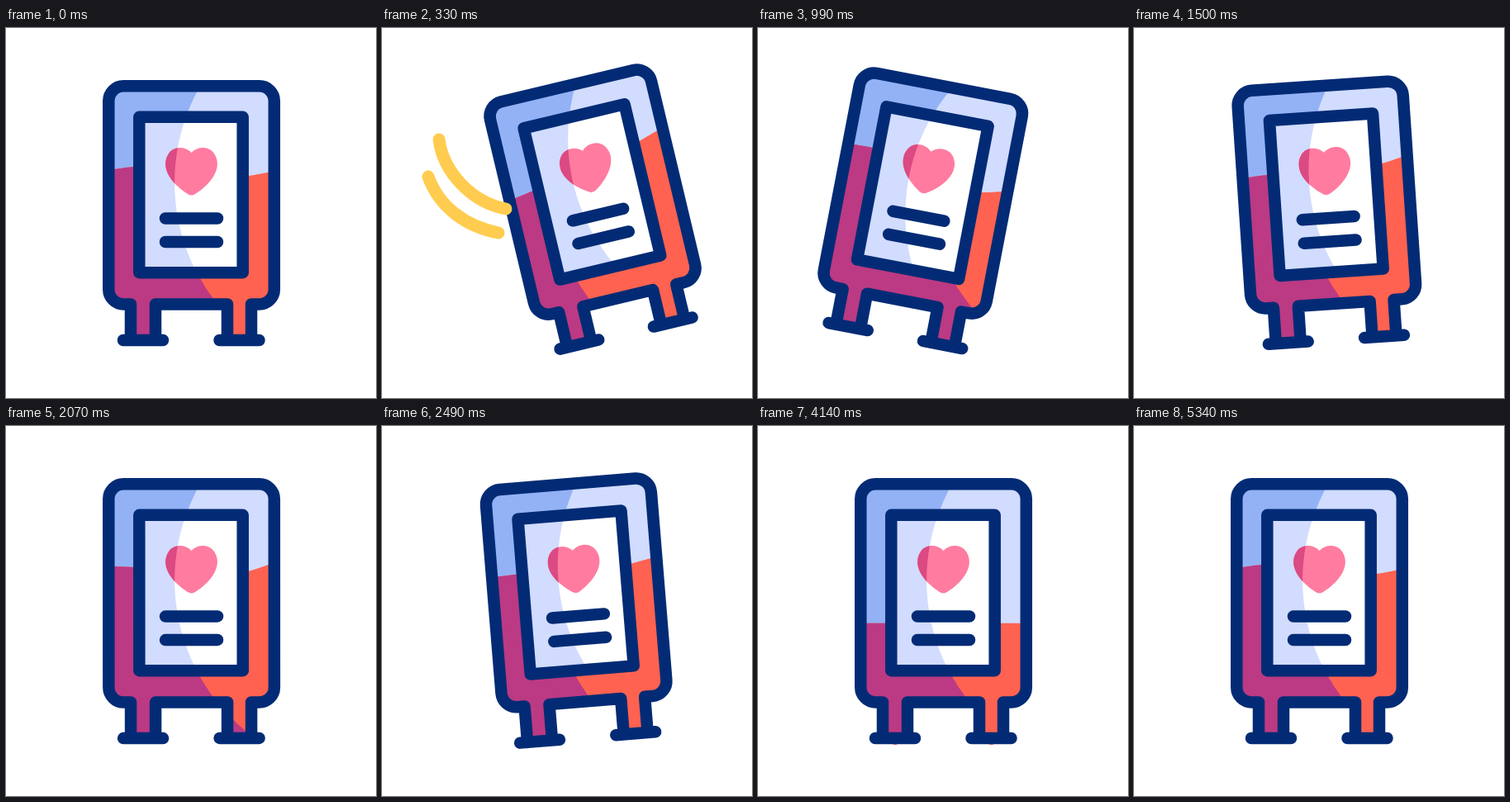
These frames come from a looping animation (448 by 448 pixels, 5400 ms). An HTML page:

```html
<!DOCTYPE html>
<html>
<head>
<meta charset="utf-8">
<style>
html, body { margin: 0; width: 100%; height: 100%; overflow: hidden; background: #fff; }
svg { display: block; width: 100vw; height: 100vh; }
.line { fill: none; stroke: #032b75; stroke-width: 14.5; stroke-linecap: round; stroke-linejoin: round; }
.trail { fill: none; stroke: #ffcc4f; stroke-width: 15; stroke-linecap: round; }
</style>
</head>
<body>
<svg viewBox="0 0 448 448">
  <defs>
    <path id="shade" d="M240 62A236 236 0 0 0 328.5 395H0V62Z"/>
    <path id="heart" d="M224.5 151C232 143 246 143 252 152C260 164 255 178 243 190Q236 197 229 201Q224.5 204 220 201Q213 197 206 190C194 178 189 164 197 152C203 143 217 143 224.5 151Z"/>
    <path id="drop" d="M0 -13C4 -6 7 -2 7 3A7 7 0 0 1 -7 3C-7 -2 -4 -6 0 -13Z"/>
    <clipPath id="inside">
      <rect x="124" y="70" width="201" height="265" rx="18"/>
      <rect x="151" y="325" width="30" height="53"/>
      <rect x="268" y="325" width="29" height="53"/>
    </clipPath>
    <clipPath id="inLiquid"><path class="liquid"/></clipPath>
    <clipPath id="inPaper"><rect x="161" y="108" width="126" height="188"/></clipPath>
    <clipPath id="inHeart"><use href="#heart"/></clipPath>
  </defs>

  <g id="drops" fill="#ff6250">
    <use href="#drop" x="166"/>
    <use href="#drop" x="282.5"/>
  </g>

  <g id="bag">
    <g clip-path="url(#inside)">
      <path d="M100 50H350V400H100Z" fill="#d1dcfe"/>
      <use href="#shade" fill="#93b2f5"/>
      <path class="liquid" fill="#ff6250"/>
      <g clip-path="url(#inLiquid)"><path id="still" fill="#bb3a83"/></g>
    </g>
    <path class="line" d="M297 378V334.5H306.8A18 18 0 0 0 324.8 316.5V88.3A18 18 0 0 0 306.8 70.3H142.3A18 18 0 0 0 124.3 88.3V316.5A18 18 0 0 0 142.3 334.5H151V378M181 378V334.5H268V378M142 378H190M258.5 378H306.5"/>
    <g clip-path="url(#inPaper)">
      <path d="M161 108H287V296H161Z" fill="#fff"/>
      <use href="#shade" fill="#d1dcfe"/>
    </g>
    <use href="#heart" fill="#ff7ca0"/>
    <g clip-path="url(#inHeart)"><use href="#shade" fill="#db4a82"/></g>
    <path class="line" d="M161.3 107.8H286.7V296.2H161.3ZM193 230.5H256M193 259H256"/>
  </g>

  <path class="trail" pathLength="100" d="M69 135C74 174 108 211 150 219"/>
  <path class="trail" pathLength="100" d="M56 180C69 216 100 240 141 248"/>
</svg>
<script>
const LOOP = 5400, LEVEL = 172.5;
const $ = s => document.querySelector(s), all = s => document.querySelectorAll(s);
const bag = $('#bag'), still = $('#still'), drops = $('#drops');
const liquid = all('.liquid'), trails = all('.trail');

// time, angle of the bag
const swing = [[0, 0], [330, -13.4], [430, -16], [570, -9.7], [810, 16], [990, 10.9],
  [1140, 4.3], [1370, -10.2], [1500, -3.9], [1750, 5], [2070, 0], [2280, -4.5],
  [2390, -5], [2850, -.9], [2950, 0], [LOOP, 0]];

// time, left and right surface offset, S-wave, bulge
const slosh = [[0, -1.5, 2, -5.8, 2], [330, 15.5, -24.5, -.8, 4.5], [430, 17, -26, 0, 4],
  [810, -19, 17, -5, 5], [990, -12.5, 10, -7.9, 6.6], [1370, 9, -14, -4, 6],
  [1500, 2.5, -9.8, -3.2, 5.9], [1750, -4, 3, -5, 8], [2070, -2.5, -4.5, -4.4, 11],
  [2400, 3, -5, -3, 6], [2950, 0, 0, 0, 0], [4600, 0, 0, 0, 0],
  [5340, -1.5, 2, -5.8, 2], [LOOP, -1.5, 2, -5.8, 2]];

const part = (t, a, b) => Math.min(1, Math.max(0, (t - a) / (b - a)));
const ease = p => (1 - Math.cos(Math.PI * p)) / 2;

// monotone cubic through one column of keys
function at(keys, col, t) {
  const rate = i => i < 0 || i > keys.length - 2 ? 0 :
    (keys[i + 1][col] - keys[i][col]) / (keys[i + 1][0] - keys[i][0]);
  const tangent = i => {
    const a = rate(i - 1), b = rate(i);
    return a * b > 0 ? 2 * a * b / (a + b) : 0;
  };
  let i = 0;
  while (i < keys.length - 2 && t >= keys[i + 1][0]) i++;
  const h = keys[i + 1][0] - keys[i][0], p = (t - keys[i][0]) / h, q = 1 - p;
  return keys[i][col] * (1 + 2 * p) * q * q + keys[i + 1][col] * (3 - 2 * p) * p * p
    + h * p * q * (tangent(i) * q - tangent(i + 1) * p);
}

function surface(t) {
  const level = LEVEL + 76 * (ease(part(t, 2970, 4500)) - ease(part(t, 4530, 5340)));
  const [left, right, wave, bulge] = [1, 2, 3, 4].map(c => at(slosh, c, t));
  let d = 'M110 400';
  for (let x = 119; x <= 331; x += 4) {
    const u = (x - 131) / 187;
    const y = level + left + (right - left) * u
      + wave * Math.sin(2 * Math.PI * u) + bulge * Math.sin(Math.PI * u);
    d += `L${x} ${y.toFixed(2)}`;
  }
  return d + 'V400Z';
}

function draw(t) {
  const angle = at(swing, 1, t);
  bag.setAttribute('transform', `rotate(${angle} 224 71)`);

  const d = surface(t);
  liquid.forEach(e => e.setAttribute('d', d));

  // the shadow in the liquid does not turn with the bag
  const resting = t < 60 || t > 2900;
  still.setAttribute('d', `M240 62A236 236 0 0 0 ${resting ? '265 345V395' : '328.5 395'}H0V62Z`);
  still.setAttribute('transform', `rotate(${-angle} 224 71)`);

  const head = 100 * ease(part(t, 60, 290)), tail = 100 * ease(part(t, 370, 560));
  trails.forEach(e => {
    e.style.display = head > tail ? '' : 'none';
    e.style.strokeDasharray = `0 ${tail} ${head - tail} 200`;
  });

  const fall = (t - 3000) / 375 % 1;
  drops.style.display = t > 3000 && t < 4500 ? '' : 'none';
  drops.setAttribute('transform', `translate(0 ${376 + 90 * fall * fall})`);
}

function tick() {
  draw(performance.now() % LOOP);
  requestAnimationFrame(tick);
}
tick();
</script>
</body>
</html>
```
